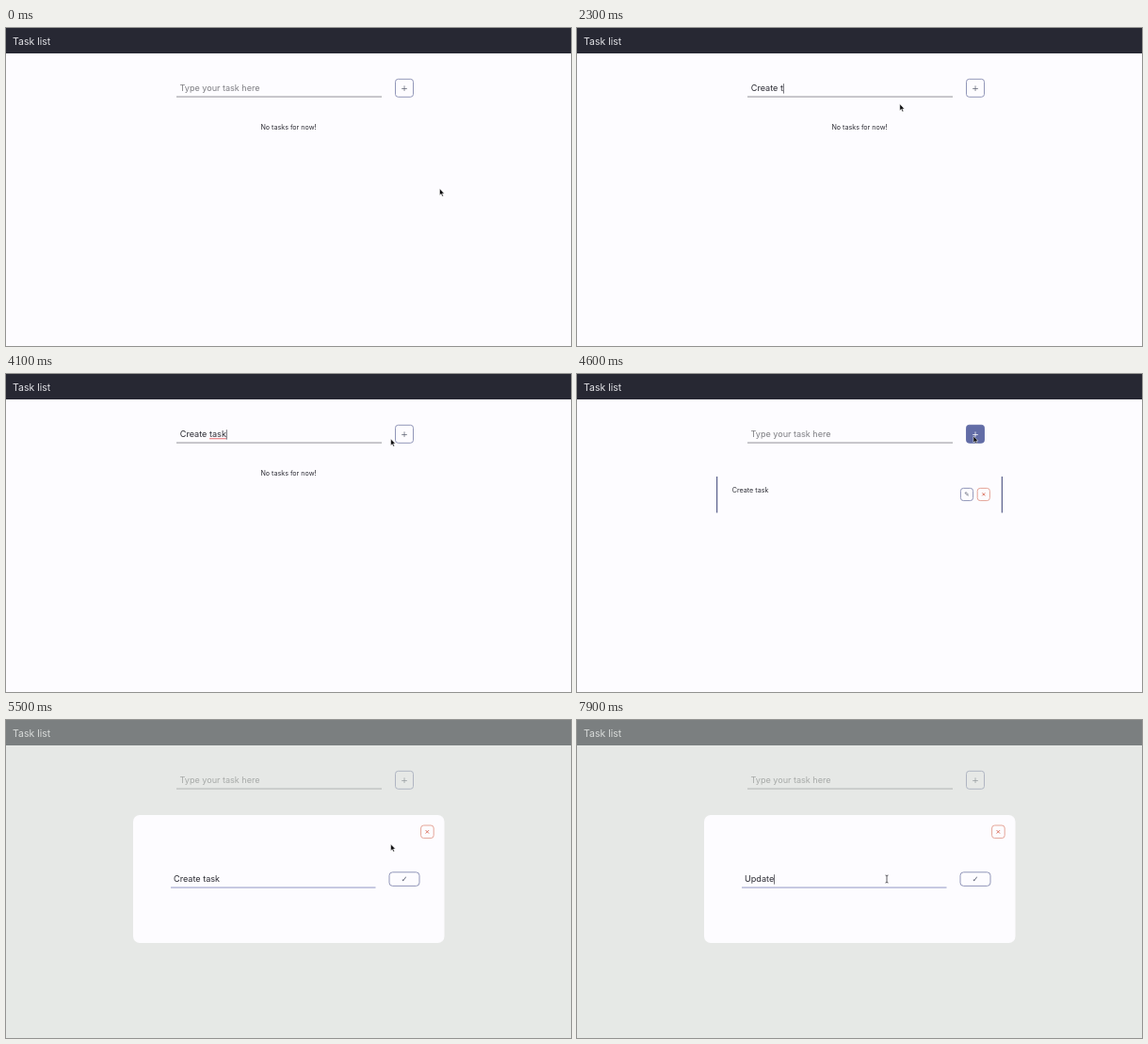
Write an HTML page that moves like this. It is 600x338 px and loops after 8 s.

```html
<!DOCTYPE html>
<html lang="en">
<head>
<meta charset="utf-8">
<title>Task list</title>
<style>
  html, body { margin: 0; width: 100%; height: 100%; overflow: hidden; background: #fdfcff; }
  svg { display: block; width: 100vw; height: 100vh; }
  text { font-family: Inter, "Open Sans", sans-serif; white-space: pre; fill: #2b2b33; }
  .field { font-size: 9.1px; }
  .hint { font-size: 9.05px; fill: #7d7d82; }
  .small { font-size: 7.15px; }
  .glyph { font-family: "DejaVu Sans", sans-serif; text-anchor: middle; }
  .btn rect { fill: #fdfcff; stroke: #858bb0; stroke-width: .9; }
  .btn text { fill: #5d6273; }
  .btn.on rect { fill: #626ca6; stroke: #626ca6; }
  .btn.on text { fill: #fff; }
  .red rect { stroke: #e39a8c; }
  .red path { stroke: #d2563f; stroke-width: .8; fill: none; }
  .caret { fill: #33333b; }
  .spell { fill: #e0484c; }
</style>
</head>
<body>
<svg viewBox="0 0 600 338" preserveAspectRatio="none">
  <rect width="600" height="338" fill="#fdfcff"/>
  <rect width="600" height="27" fill="#272833"/>
  <text x="7" y="17.8" style="font-size:10.5px;fill:#e4e4e8">Task list</text>

  <rect x="181" y="72.6" width="218" height=".9" fill="#85858c"/>
  <text id="hint" class="hint" x="184.6" y="67.4">Type your task here</text>
  <g id="entry"></g>
  <g id="add" class="btn">
    <rect x="413.5" y="54.3" width="19" height="19" rx="3"/>
    <text class="glyph" x="423" y="67.2" font-size="9">+</text>
  </g>

  <text id="empty" class="small" x="300" y="108.1" text-anchor="middle">No tasks for now!</text>

  <g id="row">
    <path d="M148.6 109V147.5M451.4 109V147.5" stroke="#5f6590" stroke-width="1.3"/>
    <text class="small" x="164.8" y="126">Create task</text>
    <g id="edit" class="btn">
      <rect x="407.4" y="121.4" width="13.2" height="13.2" rx="3"/>
      <text class="glyph" x="414" y="130.3" font-size="6.5">✎</text>
    </g>
    <g class="btn red">
      <rect x="425.2" y="121.4" width="13.2" height="13.2" rx="3"/>
      <path d="M430.3 126.4l3 3m0-3l-3 3"/>
    </g>
  </g>

  <g id="modal">
    <rect width="600" height="338" fill="rgb(207,213,205)" fill-opacity=".5"/>
    <rect x="135" y="101" width="330.5" height="136" rx="7" fill="#fdfcff"/>
    <g class="btn red">
      <rect x="440.6" y="112" width="13.6" height="13.6" rx="3"/>
      <path d="M445.6 117.1l3.5 3.5m0-3.5l-3.5 3.5"/>
    </g>
    <rect x="175" y="177.6" width="217.5" height=".9" fill="#858cbd"/>
    <g id="draft"></g>
    <g class="btn">
      <rect x="407" y="161.8" width="32" height="14.6" rx="3.5"/>
      <text class="glyph" x="423" y="172.3" font-size="8.5">✓</text>
    </g>
  </g>

  <path id="arrow" d="M0 0V7L1.6 5.5L2.7 8.1L3.9 7.6L2.8 5.1H4.9Z"
        fill="#08080a" stroke="#fff" stroke-width=".5" stroke-linejoin="round"/>
  <path id="beam" d="M-1.5 -4Q0 -4 0 -3Q0 -4 1.5 -4M0 -3V3M-1.5 4Q0 4 0 3Q0 4 1.5 4"
        fill="none" stroke="#333338" stroke-width=".8"/>
</svg>
<script>
const LOOP = 8000, STEP = 100;
const $ = id => document.getElementById(id);

// [time, value]: each value holds until the next row
const entryText = [[0, ""], [1100, "C"], [1400, "Cre"], [1600, "Crea"], [1900, "Creat"],
  [2000, "Create"], [2200, "Create "], [2300, "Create t"], [2500, "Create ta"],
  [2600, "Create tas"], [2700, "Create task"], [4500, ""]];
const entryCaret = [[0, 0], [800, 1], [3300, 0], [3800, 1], [4400, 0]];
const entrySpell = [[0, 0], [3900, 1], [4500, 0]];
const draftText = [[0, "Create task"], [7100, "U"], [7500, "Upd"], [7600, "Upda"], [7900, "Update"]];
const draftCaret = [[0, 0], [6000, 1], [6600, 0], [7100, 1]];
const draftSpell = [[0, 0], [6000, 1], [7100, 0]];
const draftPick = [[0, 0], [6700, 1], [7100, 0]];

// [time, x, y]: pointer tip, eased between rows
const path = [[0, 460.5, 170.8], [400, 460.5, 170.8], [800, 342.8, 80.8], [3700, 342.8, 80.8],
  [4100, 408.6, 69], [4300, 421, 66], [4600, 421, 66], [4900, 345, 157], [5300, 411.6, 131],
  [5400, 411.6, 131], [5500, 408.6, 132], [5800, 329, 169], [LOOP, 329, 169]];

const at = (rows, t) => rows.findLast(r => r[0] <= t)[1];

function pointer(t) {
  const i = path.findIndex(p => p[0] > t);
  const [t0, x0, y0] = path[i - 1], [t1, x1, y1] = path[i];
  const u = (t - t0) / (t1 - t0), k = u * u * (3 - 2 * u);
  return [x0 + (x1 - x0) * k, y0 + (y1 - y0) * k];
}

function make(parent, tag, attrs) {
  const el = document.createElementNS("http://www.w3.org/2000/svg", tag);
  for (const k in attrs) el.setAttribute(k, attrs[k]);
  return parent.appendChild(el);
}

const show = (el, on) => el.style.visibility = on ? "visible" : "hidden";

function makeField(id, x, y) {
  const g = $(id);
  const pick = make(g, "rect", { x, y: y - 9, height: 12, fill: "#b4d5fb" });
  const text = make(g, "text", { class: "field", x, y });
  const spell = make(g, "rect", { class: "spell", y: y + 1, height: .8 });
  const caret = make(g, "rect", { class: "caret", y: y - 8.2, width: .7, height: 10.4 });
  return (value, hasCaret, hasSpell, picked, visible = true) => {
    text.textContent = value;
    const w = value ? text.getComputedTextLength() : 0;
    caret.setAttribute("x", x + w);
    pick.setAttribute("width", w);
    if (hasSpell) {
      const lead = text.getSubStringLength(0, 7);
      spell.setAttribute("x", x + lead);
      spell.setAttribute("width", w - lead);
    }
    show(caret, visible && hasCaret);
    show(spell, visible && hasSpell);
    show(pick, visible && picked);
    show(text, visible);
  };
}

const entry = makeField("entry", 184.8, 67.4);
const draft = makeField("draft", 178, 172.4);

const inside = (x, y, l, t, r, b) => x >= l && x <= r && y >= t && y <= b;

function draw(t) {
  const typed = at(entryText, t), listed = t >= 4500, open = t >= 5500;
  const [x, y] = pointer(t);
  show($("hint"), !typed);
  show($("empty"), !listed);
  show($("row"), listed);
  show($("modal"), open);
  entry(typed, at(entryCaret, t), at(entrySpell, t), 0);
  draft(at(draftText, t), at(draftCaret, t), at(draftSpell, t), at(draftPick, t), open);
  $("add").classList.toggle("on", !open && inside(x, y, 413, 54, 433, 74));
  $("edit").classList.toggle("on", listed && inside(x, y, 407, 121, 421, 135));

  const typing = open && inside(x, y, 175, 160, 392, 178);
  for (const id of ["arrow", "beam"]) {
    $(id).setAttribute("transform", `translate(${x} ${y})`);
    show($(id), (id === "beam") === typing);
  }
}

const start = performance.now();
let last = -1;
function tick() {
  const t = Math.floor(((performance.now() - start) % LOOP) / STEP) * STEP;
  if (t !== last) draw(last = t);
  requestAnimationFrame(tick);
}
tick();
</script>
</body>
</html>
```
